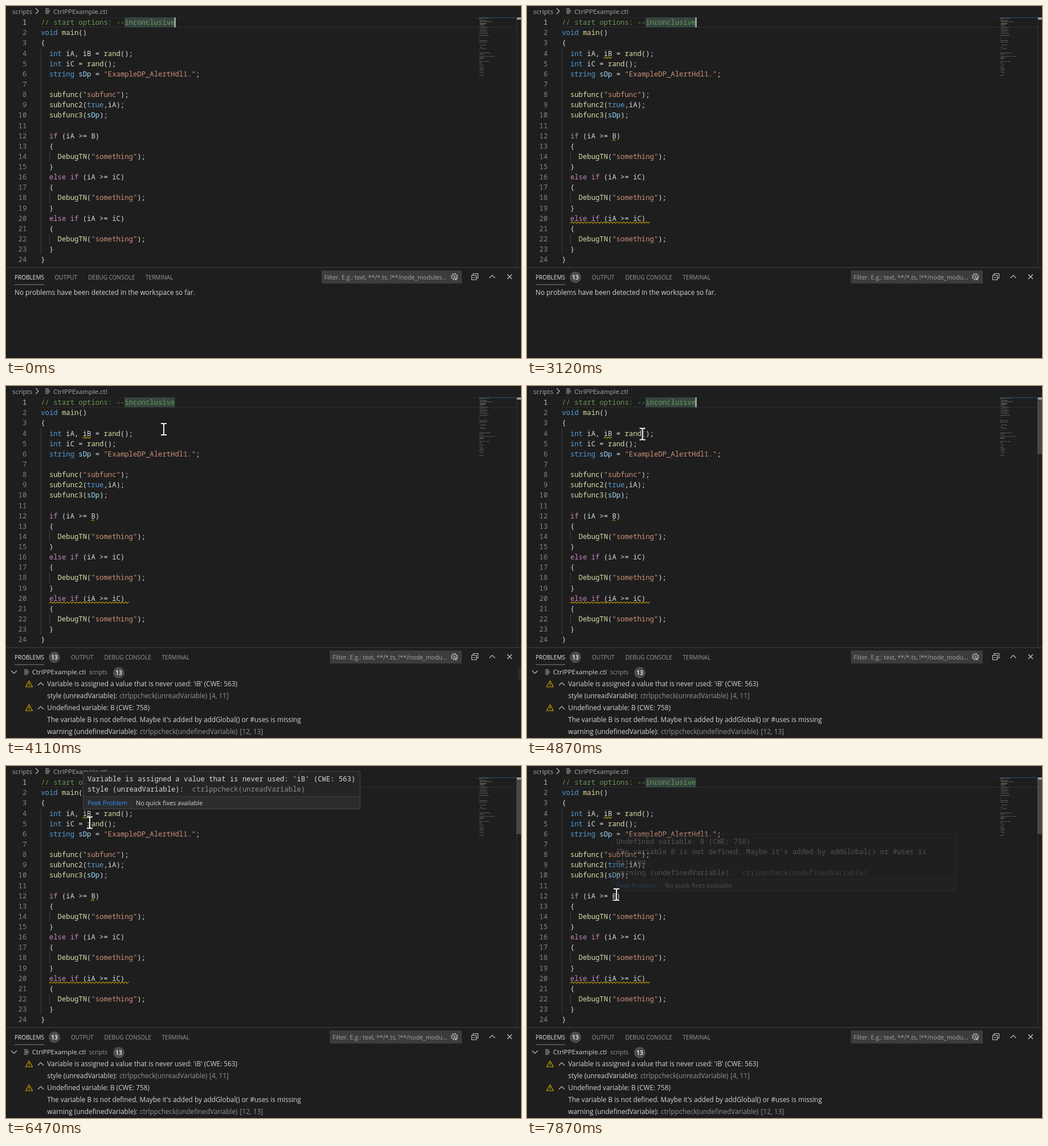
An HTML page for the animation above (8000 ms loop, 904 px wide and 619 px high).

```html
<!DOCTYPE html>
<html lang="en">
<head>
<meta charset="utf-8">
<title>Editor check</title>
<style>
html, body { margin: 0; width: 100%; height: 100%; overflow: hidden; background: #1e1e1e; }
svg { display: block; width: 100%; height: 100%; }
text { white-space: pre; font-family: "Open Sans", "Noto Sans", sans-serif; }
.m { font-family: "Noto Sans Mono", "DejaVu Sans Mono", monospace; font-size: 12.25px; font-weight: 500; }
.big { font-family: Roboto, sans-serif; font-size: 30.4px; letter-spacing: .1px; }
.line { fill: none; stroke: #c5c5c5; stroke-width: 1.1; }
</style>
</head>
<body>
<svg id="stage" viewBox="0 0 904 619"></svg>
<script>
const LOOP = 8000, CH = 7.35, LH = 18.13, LEFT = 61.2, TOP = 20;
const CODE = `// start options: --inconclusive
void main()
{
  int iA, iB = rand();
  int iC = rand();
  string sDp = "ExampleDP_AlertHdl1.";

  subfunc("subfunc");
  subfunc2(true,iA);
  subfunc3(sDp);

  if (iA >= B)
  {
    DebugTN("something");
  }
  else if (iA >= iC)
  {
    DebugTN("something");
  }
  else if (iA >= iC)
  {
    DebugTN("something");
  }
}`.split("\n");

const COLORS = ["#6a9955", "#ce9178", "#569cd6", "#c586c0", "#dcdcaa", "#9cdcfe"];
const TOKENS = /(\/\/.*)|("[^"]*")|\b(int|void|string|true)\b|\b(if|else)\b|(\w+(?=\())|\b(sDp)\b/g;

const text = (x, y, s, fill = "#d4d4d4", size = 11.8, extra = "") =>
  `<text x="${x}" y="${y}" fill="${fill}" font-size="${size}" ${extra}>${s}</text>`;
const mono = (x, y, s, fill = "#dadada", extra = "") =>
  `<text class="m" x="${x}" y="${y}" fill="${fill}" ${extra}>${s}</text>`;
const rect = (x, y, w, h, fill, extra = "") =>
  `<rect x="${x}" y="${y}" width="${w}" height="${h}" fill="${fill}" ${extra}/>`;
const path = (d, extra = "") => `<path class="line" d="${d}" ${extra}/>`;
const group = (id, body) => `<g id="${id}">${body}</g>`;
const chevron = (x, y, dx, dy) => dx
  ? path(`M${x - 2.5} ${y - 5}l5 5l-5 5`)
  : path(`M${x - 5} ${y + dy * -2.5}l5 ${dy * 5}l5 ${dy * -5}`);
const fileIcon = (x, y) => path(`M${x} ${y - 4}h6M${x} ${y - 1.3}h8M${x} ${y + 1.3}h8M${x} ${y + 4}h6`);
const badge = (x, y) => `<circle cx="${x}" cy="${y}" r="10" fill="#4d4d4d"/>` +
  text(x, y + 3.7, "13", "#ffffff", 10, 'text-anchor="middle" font-weight="600"');

function codeView() {
  let out = "";
  CODE.forEach((s, i) => {
    const y = 33.2 + i * LH;
    out += mono(36.3, y, i + 1, i ? "#858585" : "#c6c6c6", 'text-anchor="end"');
    const body = s.replace(TOKENS, (all, ...g) =>
      `<tspan fill="${COLORS[g.slice(0, 6).findIndex(Boolean)]}">${all}</tspan>`);
    out += mono(LEFT, y, body);
  });
  return out;
}

function guides() {
  let out = rect(61, TOP + 3 * LH, 1, 20 * LH, "#404040");
  for (const n of [14, 18, 22]) out += rect(76, TOP + (n - 1) * LH, 1, LH, "#404040");
  return out;
}

function minimap() {
  const row = (n, col, len, color) =>
    rect(830.5 + col * .61, 21 + n * 1.27, len * .61, .8, color, 'opacity=".5"');
  let out = rect(830, 20, 66, 1, "#264f78");
  CODE.forEach((s, i) => {
    for (const w of s.matchAll(/\S+/g)) out += row(i, w.index, w[0].length, i ? "#b8b8a8" : "#6a9955");
  });
  // remaining rows: row, indent, length
  const rest = [[24, 0, 28], [26, 0, 2], [29, 0, 2], [31, 0, 24], [33, 2, 20], [34, 0, 2], [37, 4, 16],
    [40, 2, 6], [42, 4, 16], [44, 0, 2], [48, 0, 32], [50, 0, 12], [55, 0, 14], [56, 2, 8], [60, 0, 10],
    [60, 12, 6], [60, 21, 8], [62, 2, 6], [63, 0, 2], [65, 2, 10], [68, 0, 10], [70, 2, 12], [72, 2, 11],
    [73, 0, 2], [75, 2, 12], [79, 0, 12]];
  for (const r of rest) out += row(...r, "#b8b8b8");
  return out + row(53, 1, 16, "#b8b8b8") + row(53, 18, 28, "#569cd6");
}

function squiggle(line, col, len) {
  const x = LEFT + col * CH, y = TOP + line * LH - 1.7, end = x + len * CH;
  let d = `M${x} ${y + 1.2}`;
  for (let k = 1; x + k * 2.85 <= end + 1; k++) d += `L${x + k * 2.85} ${y + (k % 2 ? -1.2 : 1.2)}`;
  return `<path d="${d}" fill="none" stroke="#cca700" stroke-width="1.1"/>`;
}

const tabs = (...xs) => ["OUTPUT", "DEBUG CONSOLE", "TERMINAL"]
  .map((s, i) => text(xs[i], 480.7, s, "#9a9a9a", 10.05)).join("");
const filter = (x, s) => rect(x, 465, 800 - x, 23, "#3c3c3c") + text(x + 4.7, 480.8, s, "#a6a6a6", 10.55);

function warning(y) {
  return `<path d="M40.5 ${y - 5.5}L46.5 ${y + 5}H34.5Z" fill="none" stroke="#cca700" stroke-width="1.2" stroke-linejoin="round"/>` +
    rect(40, y - 2, 1.1, 3.5, "#cca700") + rect(40, y + 2.4, 1.1, 1.1, "#cca700") + chevron(61, y, 0, -1);
}

function problems() {
  const row = (y, a, x2, b, x3, c) => text(72.3, y, a) +
    (b ? text(x2, y, b, "#929292") + text(x3, y, c, "#929292") : "");
  return chevron(14, 503, 0, 1) + fileIcon(32, 503) +
    text(45.7, 507.4, "CtrlPPExample.ctl", "#d4d4d4", 11.55) +
    text(146, 507.4, "scripts", "#969696", 10.5) + badge(198, 504) +
    warning(524) + row(528.4, "Variable is assigned a value that is never used: 'iB' (CWE: 563)") +
    row(549.4, "style (unreadVariable):", 199, "ctrlppcheck(unreadVariable)", 357, "[4, 11]") +
    warning(566) + row(570.4, "Undefined variable: B (CWE: 758)") +
    row(591.4, "The variable B is not defined. Maybe it's added by addGlobal() or #uses is missing") +
    row(612.4, "warning (undefinedVariable):", 235, "ctrlppcheck(undefinedVariable)", 410.5, "[12, 13]");
}

function hover(id, x, y, w, h, lines, rule) {
  let body = rect(x + .5, y + .5, w - 1, h - 1, "#252526", 'stroke="#454545"') +
    rect(x + 1, y + h - 23, w - 2, 22, "#2c2c2d") + rect(x + 1, y + h - 23, w - 2, 1, "#3c3c3d");
  lines.forEach((s, i) => body += mono(x + 8, y + 18.2 + i * 18.1, s));
  body += mono(x + 8 + rule.col * CH, y + 18.2 + (lines.length - 1) * 18.1, rule.s, "#8e8e8e");
  body += text(x + 8, y + h - 7.5, "Peek Problem", "#3794ff", 10.8) +
    text(x + 93, y + h - 7.5, "No quick fixes available", "#d4d4d4", 10.8);
  return group(id, body);
}

const beam = "M-5 -10H-2Q0 -10 0 -8V8Q0 10 -2 10H-5M5 -10H2Q0 -10 0 -8M0 8Q0 10 2 10H5";

document.getElementById("stage").innerHTML =
  rect(0, 0, 904, 619, "#1e1e1e") +
  text(11, 14, "scripts", "#a9a9a9", 11.5) + chevron(54.5, 9, 1, 0) + fileIcon(69, 9) +
  text(83, 14, "CtrlPPExample.ctl", "#a9a9a9", 11.55) +
  rect(61, 20, 835, 1, "#282828") + rect(61, 36.5, 835, 1.5, "#2a2a2a") +
  rect(208, 20, 88.5, 17.5, "#35443f") +
  guides() + codeView() + minimap() +
  rect(896, 20, 1, 440, "#333333") +
  group("slider", rect(896, 20, 8, 100, "#797979", 'opacity=".45"')) +
  rect(897, 20, 7, 4, "#9a9a9a") +
  group("caret", rect(295.7, 20, 1.9, 17.5, "#d0d0cc")) +
  group("marks", squiggle(4, 10, 2) + squiggle(12, 12, 1) + squiggle(20, 2, 19)) +
  rect(0, 459.5, 904, 1, "#454545") +
  text(15, 480.7, "PROBLEMS", "#e7e7e7", 10.05) + rect(15, 489.5, 52, 1, "#808080") +
  group("before", tabs(85.5, 144, 245) + filter(554, "Filter. E.g.: text, **/*.ts, !**/node_modules...")) +
  group("after", badge(85, 477) + tabs(114, 172.5, 273.5) +
    filter(568.5, "Filter. E.g.: text, **/*.ts, !**/node_modu...")) +
  '<circle class="line" cx="787" cy="476" r="5.4" style="stroke-width:1.6;stroke-dasharray:2.1 2.14"/>' +
  '<circle class="line" cx="787" cy="476" r="4.2" style="stroke-width:.9"/>' +
  '<circle class="line" cx="787" cy="476" r="1.5" style="stroke-width:.9"/>' +
  path("M787 479h6M788.5 481.5h3") +
  path("M817.5 473.5h8v8h-8zM820 473.5v-3h8.5v8h-3M819.5 477.5h4") +
  chevron(853.5, 476, 0, -1) + path("M880 472l8 8M888 472l-8 8", 'style="stroke-width:1.3"') +
  group("empty", text(15, 507.5, "No problems have been detected in the workspace so far.")) +
  group("list", problems()) +
  group("bar", rect(899, 495, 5, 22, "#2b2b2b")) +
  group("save", '<text class="big" x="284.3" y="292" fill="#ffffff">Save or Strg+S or Strg+Q</text>') +
  hover("tipA", 135, 9, 487, 67, ["Variable is assigned a value that is never used: 'iB' (CWE: 563)",
    "style (unreadVariable):"], { col: 25, s: "ctrlppcheck(unreadVariable)" }) +
  hover("tipB", 149, 119, 604, 102, ["Undefined variable: B (CWE: 758)",
    "The variable B is not defined. Maybe it's added by addGlobal() or #uses is",
    "missing", "warning (undefinedVariable):"], { col: 30, s: "ctrlppcheck(undefinedVariable)" }) +
  group("mouse", `<path d="${beam}" fill="none" stroke="#1a1a1a" stroke-width="3.6"/>` +
    `<path d="${beam}" fill="none" stroke="#ffffff" stroke-width="1.9"/>`);

const el = {};
for (const g of document.querySelectorAll("g[id]")) el[g.id] = g;
const show = (id, a) => el[id].setAttribute("opacity", +a);

// the screen refreshes only at these moments: start, end, count
const STEPS = [0, 1160];
for (const [a, b, n] of [[3120, 4110, 7], [4260, 5180, 7], [5340, 5340, 1], [5510, 5510, 1], [5700, 5700, 1],
  [6140, 6140, 1], [6470, 7250, 6], [7560, 7560, 1], [7870, 7870, 1]])
  for (let i = 0; i < n; i++) STEPS.push(n > 1 ? a + (b - a) * i / (n - 1) : a);

const MOVES = [[4110, 277, 76], [5180, 154, 90], [5340, 149, 82], [6140, 148, 82],
  [6470, 147, 99.5], [7250, 146.5, 215], [7560, 157, 226]];

function mouseAt(t) {
  const i = MOVES.findIndex(k => k[0] > t);
  if (i < 0) return MOVES[MOVES.length - 1].slice(1);
  if (!i) return MOVES[0].slice(1);
  const [t0, x0, y0] = MOVES[i - 1], [t1, x1, y1] = MOVES[i];
  const u = (t - t0) / (t1 - t0), e = u * u * (3 - 2 * u);
  return [x0 + (x1 - x0) * e, y0 + (y1 - y0) * e];
}

function draw(ms) {
  const t = STEPS.filter(s => s <= ms).pop();
  const checked = t >= 3120, listed = t >= 3270;
  show("save", t >= 1160 && !checked);
  show("before", !checked);
  show("after", checked);
  show("marks", checked);
  show("empty", !listed);
  show("list", listed);
  show("bar", listed && t < 4260);
  show("slider", t >= 4260);
  show("caret", t < 3270 || (t + 660) % 1000 < 500);
  show("tipA", t < 5510 || t > 6700 ? 0 : t < 5700 ? .6 : 1);
  show("tipB", t >= 7870 ? .27 : 0);
  show("mouse", t >= 4110);
  el.mouse.setAttribute("transform", `translate(${mouseAt(t)})`);
}

const start = performance.now();
function tick() {
  draw((performance.now() - start) % LOOP);
  requestAnimationFrame(tick);
}
tick();
</script>
</body>
</html>
```
